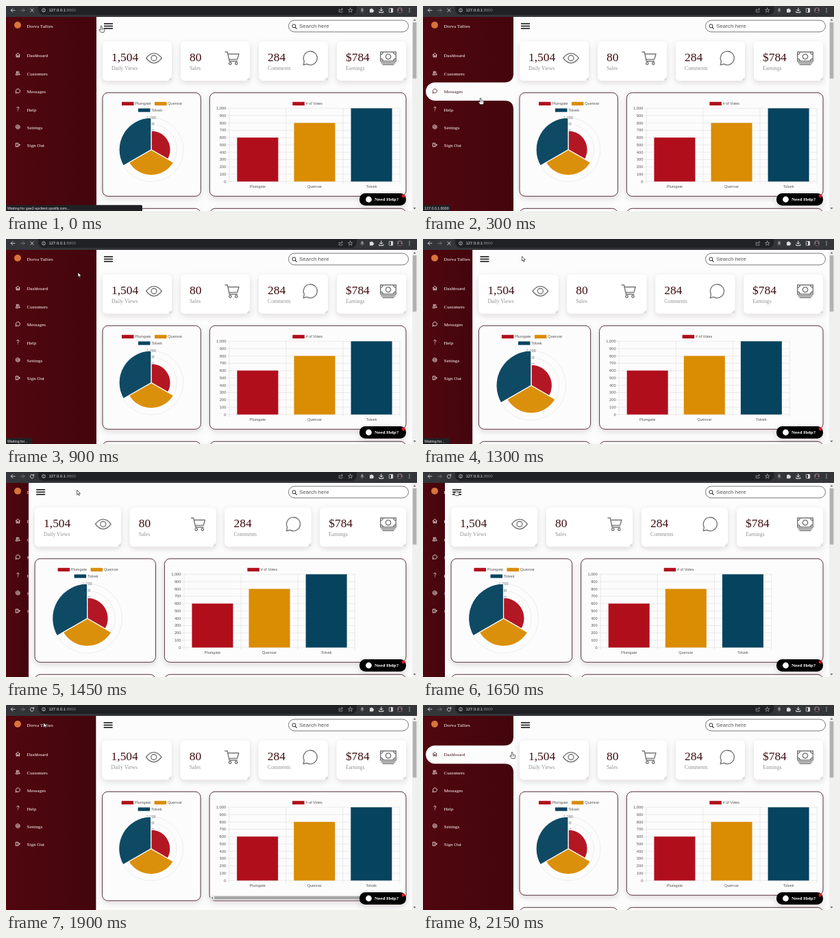
These frames come from a looping animation (600x301 px, 2200 ms). An HTML page:

```html
<!DOCTYPE html>
<html lang="en">
<head>
<meta charset="utf-8">
<title>Dashboard</title>
<style>
  html, body { margin: 0; width: 100%; height: 100%; overflow: hidden; background: #fdfcfd; }
  svg { display: block; width: 600px; height: 301px; }
  .serif { font-family: "Liberation Serif", serif; }
  .sans { font-family: "Liberation Sans", sans-serif; }
  .line { fill: none; stroke-linecap: round; stroke-linejoin: round; }
</style>
</head>
<body>
<svg viewBox="0 0 600 301">
  <defs>
    <filter id="soft" x="-20%" y="-30%" width="140%" height="170%">
      <feDropShadow dx="0" dy="3" stdDeviation="4" flood-color="#201018" flood-opacity=".14"/>
    </filter>
    <linearGradient id="maroon">
      <stop stop-color="#51070f"/><stop offset="1" stop-color="#43050c"/>
    </linearGradient>
  </defs>
  <rect width="600" height="301" fill="#fdfcfd"/>
  <g id="content"></g>
  <g id="sidebar"></g>
  <g id="chrome"></g>
  <g id="state"></g>
  <g id="cursor"></g>
</svg>
<script>
const LOOP = 2200, STEP = 50;
const OPEN = 132, CLOSED = 32, RIGHT = 584, GAP = 13;
const RED = '#b10e1c', ORANGE = '#da8c02', BLUE = '#06435f';
const series = [['Plumgate', 600, RED], ['Quenvar', 800, ORANGE], ['Tolvek', 1000, BLUE]];

const $ = id => document.getElementById(id);
const rect = (x, y, w, h, fill, extra = '') =>
  `<rect x="${x}" y="${y}" width="${w}" height="${h}" fill="${fill}" ${extra}/>`;
const circle = (x, y, r, fill, extra = '') =>
  `<circle cx="${x}" cy="${y}" r="${r}" fill="${fill}" ${extra}/>`;
const text = (x, y, str, size, fill, font = 'sans', extra = '') =>
  `<text x="${x}" y="${y}" class="${font}" font-size="${size}" fill="${fill}" ${extra}>${str}</text>`;
const line = (d, stroke, width = 1, extra = '') =>
  `<path class="line" d="${d}" stroke="${stroke}" stroke-width="${width}" ${extra}/>`;
const at = (x, y, body) => `<g transform="translate(${x} ${y})">${body}</g>`;

const stats = [
  ['1,504', 'Daily Views', 'M-11.3 0Q-6-7.2 0-7.2T11.3 0Q6 7.2 0 7.2T-11.3 0ZM4 0A4 4 0 1 1-4 0A4 4 0 1 1 4 0'],
  ['80', 'Sales', 'M-10-9H-6.8L-3.8 4.5H7.5M-6-6H10L7.7 1.8H-4.4M-1 7.8A1.7 1.7 0 1 1-4.4 7.8A1.7 1.7 0 1 1-1 7.8M8 7.8A1.7 1.7 0 1 1 4.6 7.8A1.7 1.7 0 1 1 8 7.8'],
  ['284', 'Comments', 'M-9.8 10L-8.6 4.6A10 10 0 1 1-4.7 8.7Z'],
  ['$784', 'Earnings', 'M-11.3-9H11.3V4.5H-11.3ZM-11.3-5Q-8-5.5-7.5-9M11.3-5Q8-5.5 7.5-9M-11.3 1Q-8 1-7.5 4.5M11.3 1Q8 1 7.5 4.5M3.7-2.2A3.7 3.7 0 1 1-3.7-2.2A3.7 3.7 0 1 1 3.7-2.2M-10 7H10M-8 9.5H8']
];
const menu = [
  ['Dashboard', 'M-3 0L0-3L3 0M-2.2-.6V3H-.7V.8H.7V3H2.2V-.6'],
  ['Customers', 'M-3 2.4Q-3 .4-1.2.4T.6 2.4ZM-.1-1.3A1.1 1.1 0 1 1-2.3-1.3A1.1 1.1 0 1 1-.1-1.3M1-2.4A1.1 1.1 0 0 1 1-.3M1.5.5Q3 .8 3 2.4H1.8'],
  ['Messages', 'M-3 3L-2.6 1.2A3 3 0 1 1-1.3 2.6Z'],
  ['Help', 'M-1.3-1.5Q-1.2-3 .1-3Q1.5-3 1.5-1.6Q1.5-.8.7-.3Q0 .2 0 1M0 2.8V2.9'],
  ['Settings', 'M0-3L2.7-1.5V1.5L0 3L-2.7 1.5V-1.5ZM1.2 0A1.2 1.2 0 1 1-1.2 0A1.2 1.2 0 1 1 1.2 0'],
  ['Sign Out', 'M.5-1.5V-2.6H-3V2.6H.5V1.5M-1 0H3M1.7-1.3L3 0L1.7 1.3']
];
const itemY = i => 72.8 + i * 26.4;

// Same curve as the CSS "ease" keyword.
function ease(p) {
  if (p <= 0 || p >= 1) return p <= 0 ? 0 : 1;
  const bez = (u, a, b) => 3 * u * (1 - u) ** 2 * a + 3 * u * u * (1 - u) * b + u ** 3;
  let lo = 0, hi = 1;
  for (let i = 0; i < 20; i++) {
    const mid = (lo + hi) / 2;
    if (bez(mid, .25, .25) < p) lo = mid; else hi = mid;
  }
  return bez(lo, .1, 1);
}
const sidebarWidth = t =>
  OPEN + (CLOSED - OPEN) * (ease((t - 1200) / 290) - ease((t - 1680) / 240));

// time, x, y of the pointer tip
const path = [
  [0, 139, 29], [100, 118, 66], [300, 84, 135], [500, 77, 181], [600, 78, 176],
  [750, 90, 110], [900, 105, 49], [1150, 146, 26], [1300, 144.5, 25.5], [1500, 90, 27],
  [1650, 48, 25], [1750, 48, 25], [1900, 55, 26], [2050, 108, 56], [2150, 130, 69], [2200, 139, 29]
];
function pointer(t) {
  const i = path.findIndex(k => k[0] > t);
  const a = path[i - 1], b = path[i], p = (t - a[0]) / (b[0] - a[0]);
  return { x: a[1] + (b[1] - a[1]) * p, y: a[2] + (b[2] - a[2]) * p };
}

const legend = (x, y, label, color) =>
  rect(x, y, 17.5, 5.2, color) + text(x + 19.3, y + 4.6, label, 5.5, '#555');

function statCard(i, x, w) {
  const [value, label, icon] = stats[i];
  return at(x, 0,
    rect(0, 52, w, 57.5, '#fff', 'rx="6" filter="url(#soft)"') +
    text(13, 81, value, 17.4, '#3f0d10', 'serif') +
    text(13, 94.3, label, 7.75, '#929292', 'serif') +
    at(w - 26, 76.5, line(icon, '#737373', 1.35)) +
    line(`M${w - 3.8} 108.5L${w - .8} 105.5M${w - 1.8} 108.5L${w - .8} 107.5`, '#777', .5));
}

function polarChart(cx, r) {
  const cy = 164 + r;
  let out = legend(cx - 43, 140.8, series[0][0], RED) + legend(cx + 5, 140.8, series[1][0], ORANGE) +
    legend(cx - 19, 150.4, series[2][0], BLUE);
  for (let v = 200; v <= 1000; v += 200)
    out += circle(cx, cy, r * v / 1000, 'none', 'stroke="#e3e3e3" stroke-width=".6"');
  for (let v = 200; v <= 1000; v += 200) {
    const y = cy - r * v / 1000;
    out += rect(cx - 8, y - 3.5, 16, 7, '#fdfcfd', 'opacity=".75"') +
      text(cx, y + 2, v.toLocaleString('en-US'), 5.6, '#666', 'sans', 'text-anchor="middle"');
  }
  series.forEach(([, v, color], i) => {
    const point = k => {
      const a = (k * 120 - 90) * Math.PI / 180;
      return `${cx + Math.cos(a) * r * v / 1000} ${cy + Math.sin(a) * r * v / 1000}`;
    };
    const s = r * v / 1000;
    out += `<path d="M${cx} ${cy}L${point(i)}A${s} ${s} 0 0 1 ${point(i + 1)}Z" fill="${color}" fill-opacity=".96" stroke="#fff" stroke-width="1.2"/>`;
  });
  return out;
}

function barChart() {
  const x0 = 28.5, col = 83.1, base = 257.7, top = 150.2;
  let out = legend(121, 140.8, '# of Votes', RED);
  for (let v = 0; v <= 1000; v += 100) {
    const y = base - (base - top) * v / 1000;
    out += line(`M${x0 - 3.5} ${y}H${x0 + col * 3}`, '#dedede', .6) +
      text(x0 - 4.5, y + 2, v.toLocaleString('en-US'), 5.7, '#555', 'sans', 'text-anchor="end"');
  }
  for (let i = 0; i <= 3; i++) out += line(`M${x0 + col * i} ${top}V${base + 3}`, '#dedede', .6);
  series.forEach(([name, v, color], i) => {
    const h = (base - top) * v / 1000, mid = x0 + col * (i + .5);
    out += rect(mid - 30, base - h, 60, h, color) +
      text(mid, 267.2, name, 5.5, '#555', 'sans', 'text-anchor="middle"');
  });
  return out;
}
const bars = barChart();

function drawContent(t, width) {
  const left = width + 9, total = RIGHT - left;
  const statW = (total - 3 * GAP) / 4, pieW = (total - GAP) / 3;
  const barX = left + pieW + GAP, barW = RIGHT - barX;
  const overflow = t >= 1800 && t < 1950;
  const cardH = overflow ? 160 : 152;
  const grown = Math.min(1, (OPEN - width) / 45);
  const frame = (x, y, w) =>
    rect(x, y, w, cardH, '#fdfcfd', 'rx="8" stroke="#44202a" stroke-width=".9" filter="url(#soft)"');

  let out = [26, 29.5, 33].map(y => rect(left + 2, y - .8, 13, 1.6, '#181818')).join('');
  stats.forEach((_, i) => out += statCard(i, left + i * (statW + GAP), statW));
  for (const y of [127.3, 127.3 + cardH + 18]) out += frame(left, y, pieW) + frame(barX, y, barW);
  out += polarChart(left + 71 + 5.5 * grown, 47 + 4 * grown) + at(barX, 0, bars);
  if (overflow) out += rect(barX + 1, 279.5, barW - 2, 7, '#ededed', 'rx="3"') +
    rect(barX + 7, 280.8, 232, 4.6, '#a5a5a5') +
    `<path d="M${barX + 5} 281.4v3.6l-2.2-1.8Z" fill="#666"/>`;
  $('content').innerHTML = out;
}

function drawSidebar(width, active) {
  let out = `<clipPath id="side"><rect y="16" width="${width}" height="285"/></clipPath>` +
    '<g clip-path="url(#side)">' + rect(0, 16, width, 285, 'url(#maroon)') +
    circle(17, 28, 5, '#d8743a') + text(30.5, 31.7, 'Dorva Tallies', 7.1, '#fff', 'serif');
  if (active >= 0) {
    const y = itemY(active);
    out += `<path d="M${width} ${y - 26.5}Q${width} ${y - 13.4} ${width - 13} ${y - 13.4}H17.5a13.3 13.3 0 0 0 0 26.8H${width - 13}Q${width} ${y + 13.4} ${width} ${y + 26.5}Z" fill="#fdfcfd"/>`;
  }
  menu.forEach(([label, icon], i) => {
    const color = i === active ? '#42141a' : '#fff', y = itemY(i);
    out += at(17.3, y - .8, line(icon, color, .8)) + text(30.5, y + 2.5, label, 7.1, color, 'serif');
  });
  $('sidebar').innerHTML = out + '</g>';
}

function drawChrome() {
  const ink = '#d5d6d8';
  $('chrome').innerHTML =
    rect(412.5, 21, 175, 17, '#fff', 'rx="8.5" stroke="#555" stroke-width=".8"') +
    circle(420.4, 29.4, 2.5, 'none', 'stroke="#222" stroke-width="1"') + line('M422.3 31.4L424.2 33.3', '#222', 1.1) +
    text(428, 32.3, 'Search here', 8, '#555') +
    rect(593, 16, 7, 285, '#f0f0f0') + rect(593.7, 24, 5.6, 82.5, '#b1b1b1') +
    '<path d="M594.5 21.5h4l-2-2.4ZM594.5 296h4l-2 2.4Z" fill="#666"/>' +
    rect(516, 275, 68, 18, '#000', 'rx="8.5" filter="url(#soft)"') + circle(529.5, 284, 4.4, '#fff') +
    text(538, 286.4, 'Need Help?', 7.1, '#fff', 'serif', 'font-weight="bold"') + circle(580, 279, 2.4, '#e5121f') +
    rect(0, 0, 600, 16, '#343539') + rect(47, -6, 465, 19, '#202124', 'rx="8"') +
    line('M13 6.3H7.2M9.8 3.7L7.2 6.3L9.8 8.9', ink, .9) +
    line('M21.4 6.3H27.2M24.6 3.7L27.2 6.3L24.6 8.9', '#77787b', .9) +
    circle(55, 6.3, 2.5, 'none', `stroke="${ink}" stroke-width=".7"`) + line('M55 6V7.6M55 4.8V4.9', ink, .7) +
    text(62.5, 8.4, '127.0.0.1<tspan fill="#8f9195">:8000</tspan>', 5.9, '#f1f1f1') +
    line('M487.5 5H486.2V9H491V7.6M487.8 7Q488 4.6 491.4 4.6M490 3.2L491.4 4.6L490 6', '#aaa', .7) +
    line('M502.7 3L503.6 5.3L506 5.4L504.1 6.9L504.8 9.3L502.7 8L500.6 9.3L501.3 6.9L499.4 5.4L501.8 5.3Z', '#aaa', .7) +
    rect(518.5, 3.4, 3, 3.6, '#929498', 'rx=".6"') + line('M517.8 7.3H522.2M520 7.5V9.5', '#929498', .7) +
    '<path d="M531 4.5h1.6a1 1 0 0 1 2 0h1.6v1.6a1 1 0 0 1 0 2v1.5H531Z" fill="#dedede"/>' +
    line('M547.8 3V7.2M545.7 5.4L547.8 7.5L549.9 5.4M544.8 8V9.6H550.8V8', '#eee', 1) +
    rect(559.3, 3.5, 5.4, 5.8, 'none', 'rx=".8" stroke="#ddd" stroke-width=".8"') + rect(562, 3.5, 2.7, 5.8, '#ddd') +
    circle(575, 6.3, 4, '#776a70') + circle(575, 5, 1.5, '#30272b') + '<path d="M572.4 9.2a2.6 2.6 0 0 1 5.2 0Z" fill="#30272b"/>' +
    [3.8, 6.3, 8.8].map(y => circle(589, y, .7, ink)).join('');
}

function drawState(t, linked) {
  let out = t < 1400
    ? line('M35.8 4L40.2 8.6M40.2 4L35.8 8.6', '#d5d6d8', .9)
    : line('M40.3 5A2.7 2.7 0 1 0 40.7 7M40.7 3.3V5.2H38.8', '#d5d6d8', .9);
  let label = '', width = 38.5;
  if (t < 150) { label = 'Waiting for gae2-spclient.spotify.com...'; width = 199; }
  else if (linked && t < 1100) { label = '127.0.0.1:8000'; width = 39.5; }
  else if (t < 1400) label = 'Waiting for...';
  if (label) out += rect(-2, 292.3, width + 2, 11, '#202124', 'rx="1.5"') + text(2, 299, label, 5.35, '#eee');
  $('state').innerHTML = out;
}

function drawCursor({ x, y }, hand) {
  const d = hand
    ? 'M-.9.6Q0-.6.9.6V3.6L4 4.3Q5 4.7 4.8 6L4 9.6H-.6L-3 6.3Q-3.3 5.1-2.1 5.3L-.9 6.3Z'
    : 'M0 0V6.8L1.6 5.4L2.7 7.8L3.8 7.3L2.7 5H4.9Z';
  $('cursor').innerHTML = at(x, y, `<path d="${d}" fill="#fff" stroke="#111" stroke-width=".65" stroke-linejoin="round"/>` +
    (hand ? line('M1 5V6.3M2.4 5V6.3', '#111', .4) : ''));
}

function render(t) {
  const width = sidebarWidth(t), tip = pointer(t);
  const active = tip.x > 4 && tip.x < width
    ? menu.findIndex((_, i) => Math.abs(tip.y - itemY(i)) < 13.2) : -1;
  const burger = Math.abs(tip.x - width - 17) < 11 && tip.y > 22 && tip.y < 38;
  drawContent(t, width);
  drawSidebar(width, active);
  drawState(t, active >= 0);
  drawCursor(tip, active >= 0 || burger);
}

drawChrome();
render(0);
const start = performance.now();
let shown = 0;
function tick() {
  const t = Math.floor((performance.now() - start) % LOOP / STEP) * STEP;
  if (t !== shown) render(shown = t);
  requestAnimationFrame(tick);
}
requestAnimationFrame(tick);
</script>
</body>
</html>
```
